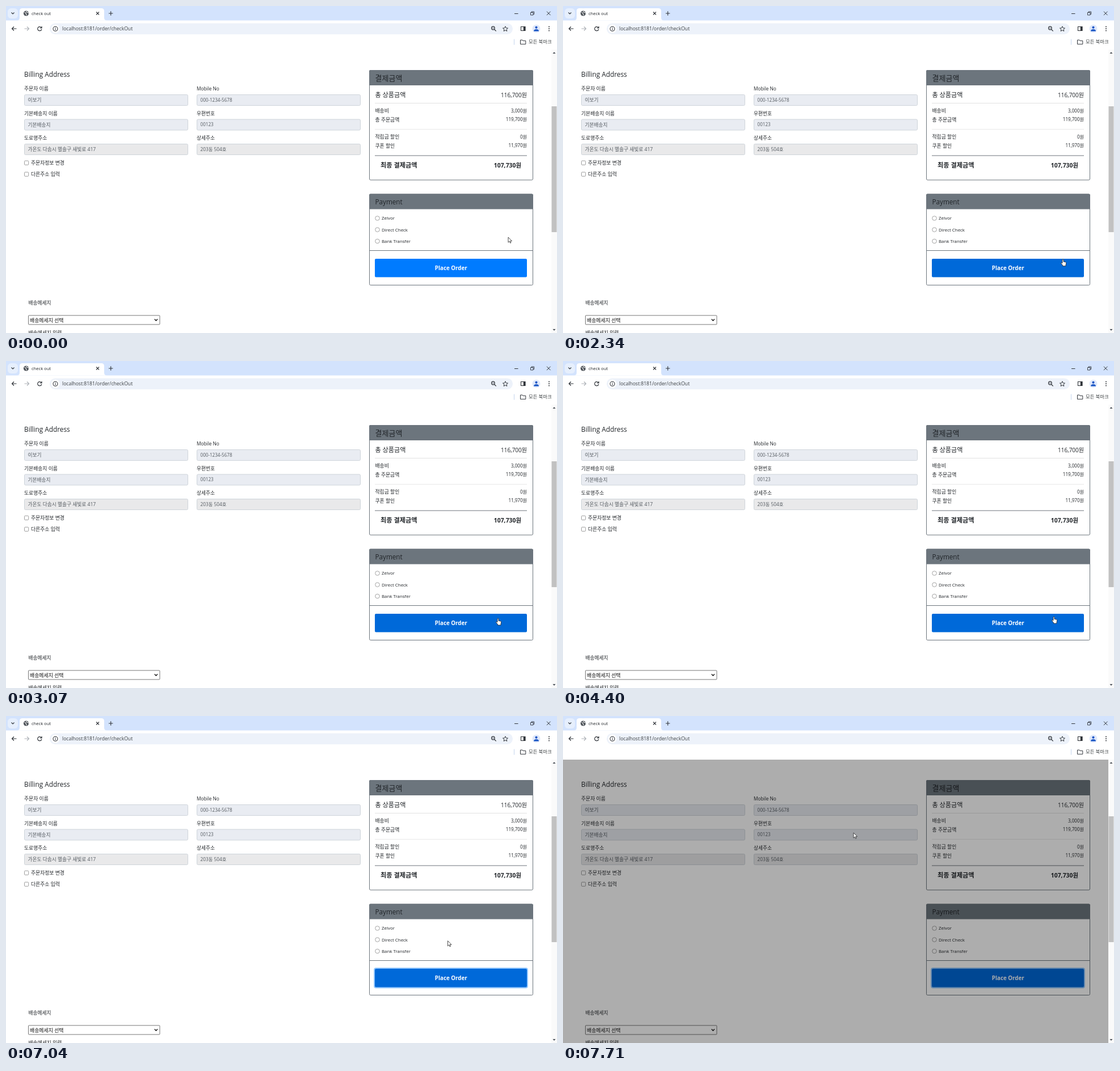
An HTML page that plays this animation: 971x577 px, repeating every 8000 ms.

```html
<!DOCTYPE html>
<html lang="ko">
<head>
<meta charset="utf-8">
<title>check out</title>
<style>
html, body { margin: 0; width: 100%; height: 100%; overflow: hidden; background: #fff; }
svg { display: block; }
text { font-family: "Open Sans", "Noto Sans CJK KR", "Noto Sans CJK", sans-serif; white-space: pre; }
</style>
</head>
<body>
<svg id="stage" width="971" height="577" viewBox="0 0 971 577"></svg>
<script>
const INK = '#212529', GREY = '#6c757d', FIELD = '#555b61', ICON = '#30343a';

// Text placed by the vertical centre of its line
const text = (x, mid, size, str, fill = INK, more = '') =>
  `<text x="${x}" y="${(mid + size * .36).toFixed(2)}" font-size="${size}" fill="${fill}" ${more}>${str}</text>`;
const right = (x, mid, size, str, more = '') => text(x, mid, size, str, INK, 'text-anchor="end" ' + more);
const box = (x, y, w, h, fill, more = '') =>
  `<rect x="${x}" y="${y}" width="${w}" height="${h}" fill="${fill}" ${more}/>`;
const line = (d, color = ICON, width = 1.1, more = '') =>
  `<path d="${d}" fill="none" stroke="${color}" stroke-width="${width}" ${more}/>`;
const ring = (x, y, r, color = ICON, fill = 'none', width = 1) =>
  `<circle cx="${x}" cy="${y}" r="${r}" fill="${fill}" stroke="${color}" stroke-width="${width}"/>`;

const browser = () => [
  box(0, 0, 971, 26, '#d3e3fd'),
  box(3, 4, 18, 18, '#e6effd', 'rx="6"'),
  line('M9.5 11.5l2.5 2.5 2.5-2.5'),
  '<path d="M19 25.5q5 0 5-5V9q0-5 5-5H168q5 0 5 5V20.5q0 5 5 5Z" fill="#fff"/>',
  `<circle cx="35.5" cy="13" r="4.6" fill="#50555b"/>`,
  line('M32.5 11.2q2 .2 2.6 2t1.4 3M36 9.2q-.4 1.8 1.6 2t2 1.6', '#fff', 1.1),
  text(45, 13.5, 7.6, 'check out'),
  line('M159 10.5l5 5M164 10.5l-5 5'),
  line('M181 13h7.4M184.7 9.3v7.4'),
  line('M896 13.5h6.5', ICON, 1),
  line('M924.5 11.5h4.5v4.5h-4.5ZM926 11.3V10h4.6v4.6h-1.4', ICON, .9),
  line('M953 9.7l6.5 6.5M959.5 9.7l-6.5 6.5', ICON, 1),

  box(0, 25.5, 971, 51.5, '#fff'),
  line('M18.5 40H10.5M14 36.5L10.5 40l3.5 3.5', ICON, 1.2),
  line('M32.5 40H40.5M37 36.5l3.5 3.5-3.5 3.5', '#aeb2b8', 1.2),
  line('M62.2 38A3.6 3.6 0 1 0 62.8 41M63 36v2.8h-2.8', ICON, 1.2),
  box(77, 30.5, 816, 19.5, '#edf2fa', 'rx="9.7"'),
  '<circle cx="87" cy="40.2" r="7.5" fill="#fff"/>',
  ring(87, 40.2, 4, ICON, 'none', 1.1),
  line('M87 39.6v2.8M87 37.7v1.1', ICON, 1.1),
  text(99, 40.3, 8.6, 'localhost:8181/order/checkOut', '#3c4043'),
  ring(858.4, 39, 2.8, ICON, 'none', 1.2),
  line('M860.5 41.2l3.2 3.2', ICON, 1.3),
  line('M857 39h2.8', ICON, .8),
  line('M880 35.8l1.3 3 3.2.3-2.4 2.1.7 3.2-2.8-1.7-2.8 1.7.7-3.2-2.4-2.1 3.2-.3Z', ICON, 1),
  line('M907.5 36.5h7.5v7h-7.5Z', ICON, 1.1),
  box(911.8, 36.5, 3.4, 7, ICON),
  '<circle cx="934.5" cy="40" r="7" fill="#dfe8fb"/>',
  '<circle cx="934.5" cy="37.8" r="2.1" fill="#1a56c4"/>',
  '<path d="M930 44.5q0-3.6 4.5-3.6t4.5 3.6Z" fill="#1a56c4"/>',
  ...[36.4, 40, 43.6].map(y => `<circle cx="957" cy="${y}" r="1" fill="${ICON}"/>`),
  line('M895.5 58.5v10', '#c6d5ee', 1),
  line('M906.5 60h3.5l1 1.3h4.8v6h-9.3Z', ICON, 1),
  text(921, 63, 8.4, '모든 북마크', '#3c4043'),
];

const field = (x, y, label, value, labelSize, size, fill = '#e9ecf2') => [
  text(x, y, labelSize, label),
  box(x + .5, y + 10.5, 288, 19, fill, 'rx="2" stroke="#ced4da"'),
  text(x + 6.5, y + 20, size, value, FIELD),
].join('');

const check = (y, label) =>
  box(32.5, y - 3.8, 7.2, 7.2, '#fff', 'rx="1.2" stroke="#858585" stroke-width=".8"') + text(44, y, 8.8, label);

const radio = (y, label) => ring(654.5, y, 3.8, '#8c8c8c', '#fff', .8) + text(662, y, 7.9, label);

const card = (y, bottom, title, size) => [
  box(640.5, y + .5, 288, bottom - y, '#fff', `rx="2" stroke="${GREY}"`),
  `<path d="M640 ${y + 27}V${y + 2}q0-2 2-2H926.500q2.500 0 2.500 2V${y + 27}Z" fill="${GREY}"/>`,
  text(650.5, y + 14, size, title),
].join('');

const row = (y, label, price) => text(650.5, y, 8.8, label) + right(918, y, 8.1, price);

const page = () => [
  text(32, 121, 11.8, 'Billing Address'),
  field(32, 146, '주문자 이름', '이보기', 8.8, 8.7),
  field(336, 146, 'Mobile No', '000-1234-5678', 8.3, 8.1),
  field(32, 189.5, '기본배송지 이름', '기본배송지', 8.8, 8.7),
  field(336, 189.5, '우편번호', '00123', 8.7, 8.1),
  field(32, 233, '도로명주소', '가온도 다솜시 별솔구 새빛로 417', 8.8, 8.7, '#e9e9ea'),
  field(336, 233, '상세주소', '203동 504호', 8.7, 8.3, '#e9e9ea'),
  check(277, '주문자정보 변경'),
  check(297, '다른주소 입력'),

  card(113, 306.5, '결제금액', 13),
  text(650.5, 157, 11.1, '총 상품금액'),
  right(918, 157, 10, '116,700원'),
  line('M650 171.500H918', '#e2e2e2', 1),
  row(185, '배송비', '3,000원'),
  row(200.5, '총 주문금액', '119,700원'),
  line('M650 217.500H918', '#e8e8e8', 1),
  row(231, '적립금 할인', '0원'),
  row(246.5, '쿠폰 할인', '11,970원'),
  line('M650 264H918', GREY, 1),
  text(660, 280.5, 11.2, '최종 결제금액', INK, 'font-weight="700"'),
  right(908, 281, 10.4, '107,730원', 'font-weight="700"'),

  card(331.5, 492, 'Payment', 11.7),
  radio(374.5, 'Zelvor'),
  radio(394.7, 'Direct Check'),
  radio(415, 'Bank Transfer'),
  line('M640.500 431.500H928.500', GREY, 1),
  box(649.2, 445, 269.6, 34.4, 'none', 'id="glow" rx="3" stroke="#268fff" stroke-width="2.2"'),
  box(650, 446, 268, 32.5, '#007bff', 'id="order" rx="2"'),
  text(784.3, 462.5, 9.8, 'Place Order', '#fff', 'font-weight="700" text-anchor="middle"'),

  text(39.5, 523.5, 8.7, '배송메세지'),
  box(39.5, 546, 231.5, 16, '#fff', 'rx="1" stroke="#767676"'),
  text(42, 555, 8.9, '배송메세지 선택', '#111'),
  line('M261.8 552.600l2.600 2.600 2.600-2.600', '#111', 1.4),
  text(39.5, 576.5, 8.8, '배송메세지 입력'),
];

const scrollbar = () => [
  box(961, 77, 10, 500, '#fafafa'),
  box(961.5, 177, 9, 222, '#c1c1c1'),
  '<path d="M963.500 84h5L966 81Z" fill="#50555b"/>',
  '<path d="M963.500 570h5L966 573Z" fill="#50555b"/>',
];

const pointers = [
  `<path id="arrow" d="M0 0V9.200L2.200 7.200 3.600 10.300 5 9.700 3.700 6.700H6.500Z" fill="#fff" stroke="#222" stroke-width=".8"/>`,
  `<path id="hand" d="M-1 1Q-1 0 0 0T1 1V4.300L4.800 5.200Q5.800 5.600 5.700 6.800L5 10.200V12H-.6V10.500L-3.300 7.200Q-3.600 6 -2.400 6L-1 7.100Z" fill="#fff" stroke="#222" stroke-width=".8"/>`,
];

const stage = document.getElementById('stage');
stage.innerHTML = [
  box(0, 0, 971, 577, '#fff'), ...page(),
  box(0, 77, 961, 500, '#000', 'id="dim" opacity=".32"'),
  ...scrollbar(), ...browser(), ...pointers,
].join('');
const [order, glow, dim, arrow, hand] =
  ['order', 'glow', 'dim', 'arrow', 'hand'].map(id => document.getElementById(id));

// Pointer tip: time, x, y
const path = [
  [0, 885, 408], [1200, 885, 408], [1430, 883, 455], [2310, 883, 455],
  [2340, 881, 447], [2400, 881, 432], [2540, 880, 421], [2840, 880, 421], [2870, 880.5, 423],
  [3070, 867, 454], [4399, 867, 454], [4400, 865, 451], [5469, 865, 451],
  [5510, 864, 453], [6070, 864, 453], [6170, 863, 456], [6880, 863, 456],
  [7040, 779, 397], [7070, 765, 387], [7300, 655, 308], [7500, 570, 247], [7710, 512, 206], [8000, 512, 206],
];

const ramp = (t, from, length = 170) => {
  const k = Math.min(1, Math.max(0, (t - from) / length));
  return k * k * (3 - 2 * k);
};

function pointerAt(t) {
  const i = path.findIndex(p => p[0] > t);
  const [t0, x0, y0] = path[i - 1], [t1, x1, y1] = path[i];
  const k = (t - t0) / (t1 - t0);
  return [x0 + (x1 - x0) * k, y0 + (y1 - y0) * k];
}

function draw(now) {
  const t = now % 8000;
  const [x, y] = pointerAt(t);
  const over = x > 650 && x < 918 && y > 446 && y < 478.5;
  const hover = ramp(t, 1250) - ramp(t, 2350) + ramp(t, 2900);
  order.setAttribute('fill', `rgb(0,${123 - 18 * hover},${255 - 38 * hover})`);
  glow.setAttribute('opacity', .5 * ramp(t, 6570));
  dim.style.display = t >= 7070 ? '' : 'none';
  arrow.style.display = over ? 'none' : '';
  hand.style.display = over ? '' : 'none';
  (over ? hand : arrow).setAttribute('transform', `translate(${x.toFixed(1)} ${y.toFixed(1)})`);
  requestAnimationFrame(draw);
}
requestAnimationFrame(draw);
</script>
</body>
</html>
```
